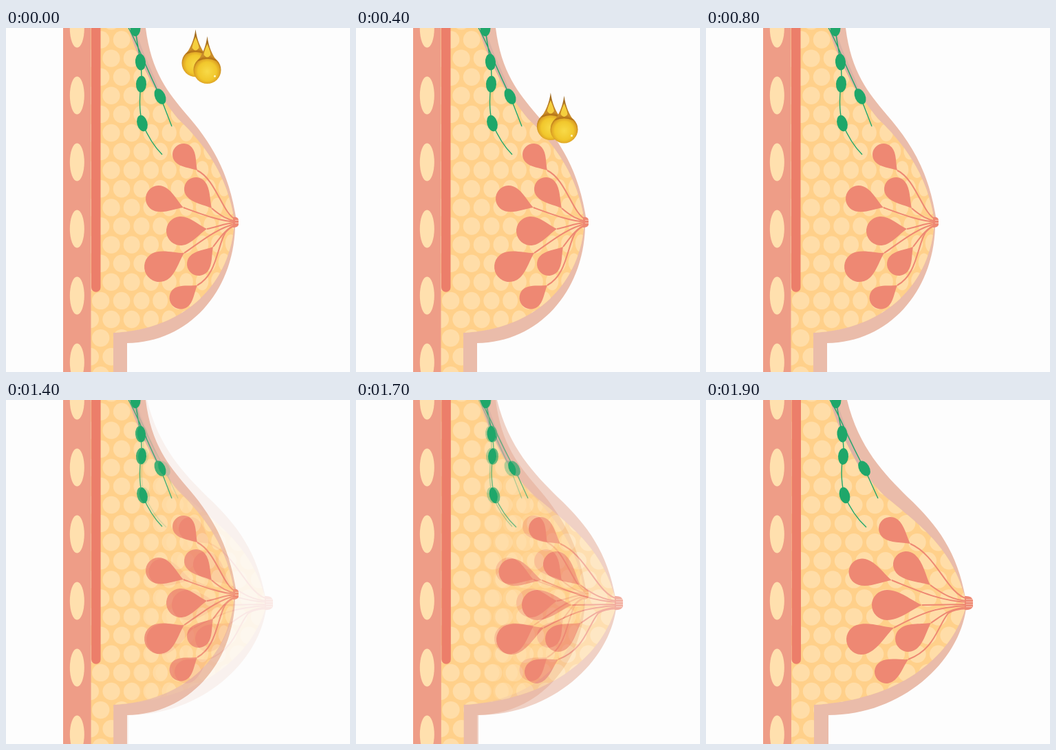
An HTML page for the animation above (4000 ms loop, 500 by 500 pixels).

```html
<!DOCTYPE html>
<html lang="en">
<head>
<meta charset="utf-8">
<title>Breast cross-section</title>
<style>
  html, body { margin: 0; height: 100%; overflow: hidden; background: #fdfdfd; }
  svg { display: block; width: 100vw; height: 100vh; }
</style>
</head>
<body>
<svg id="stage" viewBox="0 0 500 500">
  <defs>
    <radialGradient id="gold" cx=".5" cy=".55" r=".52">
      <stop offset="0" stop-color="#f8da48"/>
      <stop offset=".65" stop-color="#f1c72c"/>
      <stop offset=".88" stop-color="#dfa525"/>
      <stop offset="1" stop-color="#bd7d1c"/>
    </radialGradient>
    <linearGradient id="cone" x2="0" y2="1">
      <stop offset="0" stop-color="#97621a"/>
      <stop offset=".6" stop-color="#c4862a"/>
      <stop offset="1" stop-color="#d99d2a"/>
    </linearGradient>
    <g id="drop">
      <path d="M0 0C2 16 8 28 14 36Q0 44-14 36C-8 28-2 16 0 0Z" fill="url(#cone)"/>
      <circle cy="49" r="20" fill="url(#gold)"/>
      <path d="M-13 35Q0 29 13 35" fill="none" stroke="#b0701a" stroke-width="1.5"/>
      <path d="M0 11Q5 23 5 27Q0 34-5 27Q-5 23 0 11Z" fill="#f5cf3e"/>
      <circle cx="11" cy="58" r="1.5" fill="#fff6c8"/>
    </g>
  </defs>
</svg>
<script>
const stage = document.getElementById('stage');

// lobes: body x, y, radius, tip x, y, then the duct from the tip
const rest = {
  id: 'rest', left: 123.5, squeeze: 0.00087,
  skin: 'M160 0H203C211 65 237 95 261 124C297 165 324 207 335 280L333 290C330 384 265 457 176 458V500H150Z',
  fat: 'M123 0H178C190 45 220 95 250 132C290 170 322 215 332 280C328 370 262 438 156 443V500H123Z',
  shade: 'M178 0C188 30 202 66 225 102C220 72 200 45 188 0Z',
  nipple: 'M330 275Q337 274 338 279V286Q337 290 330 290Z',
  ridges: 'M333 279.500h5m-5 4h5',
  lobes: [
    [258, 184, 16, 278, 207, 'C306 221 314 270 335 279'],
    [276, 234, 17, 299, 262, 'C312 273 322 279 335 281'],
    [222, 248, 19, 258, 261, 'C288 272 312 281 335 282'],
    [254, 295, 21, 292, 292, 'C306 290 318 283 335 283'],
    [223, 347, 22, 259, 327, 'C283 311 304 292 335 284'],
    [280, 343, 17, 301, 318, 'C312 304 318 293 335 285'],
    [254, 392, 16.5, 278, 374, 'C304 360 306 326 316 303Q321 290 335 287']
  ],
  stems: 'M188 0C190 25 197 45 197 70C194 100 193 118 198 138C205 155 215 172 227 184M178 0C190 20 200 50 224 99L241 143',
  nodes: [[188, 0, 0], [195.5, 49.5, -5], [196.5, 81.5, 3], [198, 138.5, -15], [224, 99.5, -25]]
};

const full = {
  id: 'full', left: 124, squeeze: 0,
  skin: 'M160 0H205C222 70 260 108 293 141C338 183 365 222 377 287L378 303C368 380 285 458 178 458V500H150Z',
  fat: 'M124 0H180C195 55 225 105 258 138C305 178 355 210 376 285L377 303C355 375 280 436 157 443V500H124Z',
  shade: 'M180 0C191 34 206 72 230 108C222 74 202 45 190 0Z',
  nipple: 'M376 285Q386 284 388 291V300Q386 306 376 305Z',
  ridges: 'M378 290h9m-9 3.500h10m-10 3.500h10m-10 3.500h9',
  lobes: [
    [268, 187, 17, 297, 209, 'C336 226 350 282 380 289'],
    [291, 239, 19, 326, 269, 'C345 283 360 291 380 292'],
    [227, 250, 19.5, 270, 262, 'C310 278 340 292 380 294'],
    [263, 298, 22, 314, 298, 'L380 297'],
    [226, 348, 22, 273, 331, 'C310 312 330 301 380 299'],
    [294, 347, 19, 327, 324, 'C345 312 352 304 380 301'],
    [262, 395, 17, 294, 377, 'C332 363 336 330 352 310Q360 304 380 303']
  ],
  stems: 'M189 0C192 25 199 45 200 70C196 100 196 118 201 138C209 157 220 173 233 185M180 0C194 20 202 48 230 99L250 143',
  nodes: [[189, 0, 0], [198, 49.5, -5], [199.5, 82, 3], [201.5, 138.5, -15], [230, 99.5, -30]]
};

function lobe([x, y, r, tipX, tipY, duct]) {
  const length = Math.hypot(tipX - x, tipY - y);
  const angle = Math.atan2(tipY - y, tipX - x) * 180 / Math.PI;
  const neck = length * 0.7, bulge = length * 0.36;
  return `<path d="M${length} 0C${neck} ${-r * 0.3} ${bulge} ${-r} 0 ${-r}A${r} ${r} 0 0 0 0 ${r}C${bulge} ${r} ${neck} ${r * 0.3} ${length} 0Z"
    transform="translate(${x} ${y}) rotate(${angle})" fill="#ee8873"/>
    <path d="M${tipX} ${tipY}${duct}" fill="none" stroke="#ee8873" stroke-width="2"/>`;
}

// Hexagonal fat cells, pressed together towards the right by `squeeze`
function cells({ left, squeeze }) {
  let out = '';
  for (let row = -6; row < 14; row++) {
    for (let col = -1; col < 9; col++) {
      const x = left + 29.5 + 30.7 * (col + (row & 1) / 2);
      const reach = Math.max(0, x - 150);
      const y = 152.5 + 27.1 * row - 6 * (squeeze * reach) ** 2 * reach / 20;
      out += `<ellipse cx="${x - squeeze * reach ** 2}" cy="${y}" rx="${12.7 * (1 - 2 * squeeze * reach)}" ry="12.7"/>`;
    }
  }
  return out;
}

function scene(s) {
  const ribs = [1, 98, 195, 292, 389, 486]
    .map(y => `<ellipse cx="103.3" cy="${y}" rx="10.5" ry="27.5" fill="#ffe0ae"/>`).join('');
  const nodes = s.nodes
    .map(([x, y, turn]) => `<ellipse rx="7.5" ry="12" transform="translate(${x} ${y}) rotate(${turn})" fill="#1fa76a"/>`).join('');
  return `<g id="${s.id}">
    <clipPath id="${s.id}-fat"><path d="${s.fat}"/></clipPath>
    <rect width="500" height="500" fill="#fdfdfd"/>
    <path d="${s.skin}" fill="#eabcaa"/>
    <path d="${s.fat}" fill="#ffd08a"/>
    <g clip-path="url(#${s.id}-fat)" fill="#ffdda8">${cells(s)}</g>
    <path d="${s.shade}" fill="#dcb3a6"/>
    <rect x="83" width="${s.left - 83}" height="500" fill="#ee9d87"/>${ribs}
    <path d="M${s.left + 0.5} 0h13.500v377a6.500 6.500 0 0 1-13.500 0z" fill="#ec7e6a"/>
    ${s.lobes.map(lobe).join('')}
    <path d="${s.nipple}" fill="#ee8873"/>
    <path d="${s.ridges}" stroke="#f8c3ae"/>
    <path d="${s.stems}" fill="none" stroke="#1fa76a" stroke-width="1.4"/>${nodes}
  </g>`;
}

stage.insertAdjacentHTML('beforeend', scene(rest) + scene(full) +
  '<g id="oil"><use href="#drop"/><use href="#drop"/></g>');

const oil = document.getElementById('oil');
const [backDrop, frontDrop] = oil.children;
const fullScene = document.getElementById('full');
const clamp = v => Math.max(0, Math.min(1, v));
const place = (el, x, y) => el.setAttribute('transform', `translate(${x} ${y})`);

function draw(now) {
  const step = Math.floor(now % 4000 / 100);
  const fall = Math.min(step, 6);
  place(backDrop, 275.5 + 1.85 * fall, 2 + 23 * fall);
  place(frontDrop, 292.5 + 2.5 * fall, 12 + 21.6 * fall);
  oil.setAttribute('opacity', clamp((8 - step) / 2));
  fullScene.setAttribute('opacity', clamp((step - 13) / 6));
  requestAnimationFrame(() => draw(performance.now()));
}
draw(performance.now());
</script>
</body>
</html>
```
